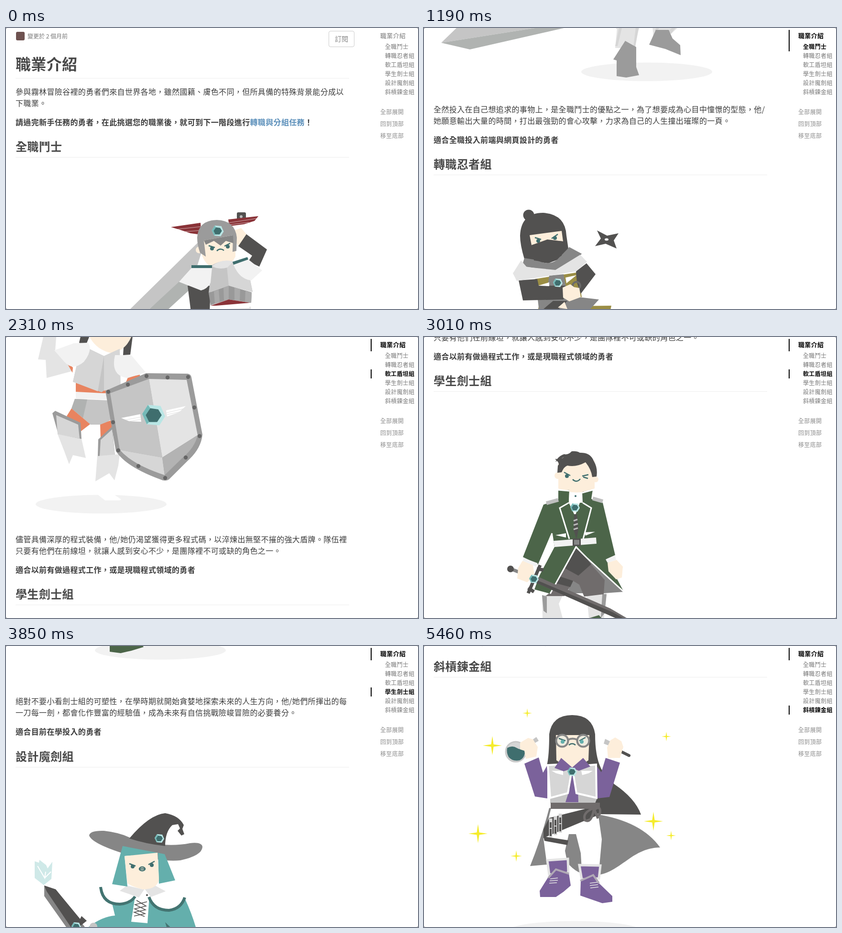
An HTML page for the animation above (5530 ms loop, 862 by 590 pixels).

```html
<!DOCTYPE html>
<html lang="zh-TW">
<head>
<meta charset="utf-8">
<title>職業介紹</title>
<style>
html, body { margin: 0; width: 100%; height: 100%; overflow: hidden; background: #888; }
body { font: 16px/24px "Noto Sans CJK TC", "Noto Sans CJK", sans-serif; letter-spacing: .35px; color: #3c3c3c; }
#stage { position: absolute; width: 862px; height: 590px; overflow: hidden; background: #fff; border-radius: 3px; }
#page, #art { position: absolute; left: 0; top: 0; width: 862px; height: 4800px; }
#page > div, #toc div, .meta { position: absolute; white-space: nowrap; }
h1, h2, p { margin: 0; }
h1, h2 { position: absolute; left: 20px; width: 698px; border-bottom: 1px solid #eee; color: #484848; }
h1 { top: 55px; height: 50px; font-size: 32px; line-height: 38px; }
h2 { height: 37px; font-size: 24px; line-height: 28px; }
p + p { margin-top: 16px; font-weight: 700; }
a { color: #5b8fba; }
.meta { left: 45px; top: 5px; font-size: 12px; letter-spacing: 0; color: #777; }
.avatar { position: absolute; left: 21px; top: 8px; width: 18px; height: 18px; border-radius: 3px; background: #6e5250; }
.button { position: absolute; left: 675px; top: 6px; width: 52px; height: 32px; border: 1px solid #ccc; border-radius: 4px;
  font-size: 14px; line-height: 31px; letter-spacing: 0; text-align: center; color: #888; }
#toc { font-size: 12px; line-height: 18px; color: #777; }
#toc .on { color: #000; font-weight: 700; }
#toc .on::before { content: ""; position: absolute; left: var(--bar); top: 0; width: 2px; height: 100%; background: #000; }
.k { fill: #525150 } .g { fill: #868686 } .m { fill: #9b9b9b } .n { fill: #c5c5c5 } .l { fill: #d6d6d6 } .e { fill: #e4e4e4 }
.f { fill: #f2f2f2 } .w { fill: #fff } .s { fill: #fdeedb } .t { fill: #3f6e6e } .c { fill: #64afac } .d { fill: #706c6c }
.r { fill: #8a3338 } .o { fill: #e88460 } .y { fill: #9b8e45 } .v { fill: #4c6549 } .p { fill: #7b629b }
.line { fill: none; stroke: #3f6e6e; stroke-width: 2.5 }
</style>
</head>
<body>
<div id="stage">
<div id="page">
<svg id="art" viewBox="0 0 862 4800">
<defs>
  <g id="gem"><path fill="#b9e6e5" d="M-5-9L6-8 10 1 5 9-6 8-10-1Z"/><path fill="#74b9b7" d="M-10-1L-5-9-3-6-7 0-4 6-6 8Z"/><path class="t" d="M-3-6L4-5 7 0 3 6-4 6-7 0Z"/></g>
  <path id="star" fill="#f5ec2b" d="M0-20L2.6-2.6 20 0 2.6 2.6 0 20-2.6 2.6-20 0-2.6-2.6Z"/>
  <ellipse id="shadow" class="f" rx="137" ry="19.5"/>
</defs>

<!-- knight -->
<g>
  <path class="n" d="M402 450L260 590 68 748 36 779 232 748 300 590 400 500 430 402Z"/>
  <path fill="#b0b3b1" d="M400 498L300 590 232 748 36 779 96 793 293 748 340 590 400 535Z"/>
  <rect class="k" x="483" y="387" width="19" height="17" rx="3"/><circle cx="492" cy="396" r="3" fill="#bbb"/>
  <path class="s" d="M478 425L492 420 504 434 486 458 478 446Z"/>
  <path class="k" d="M503 433L546 465 530 501 507 490 515 478 486 458Z"/>
  <path class="k" d="M380 541H428L426 600 412 650 390 620Z"/>
  <path class="e" d="M430 585H512L530 748 480 770 470 640 450 750H402Z"/>
  <circle class="s" cx="404" cy="466" r="7"/><path class="s" d="M405 440H480V480Q470 500 440 505Q415 500 408 470Z"/>
  <path class="n" d="M431 498Q450 486 475 490L505 500 516 554 466 541 424 556Z"/>
  <path class="l" d="M462 500L475 490 505 500 516 554 466 541Z"/>
  <path class="e" d="M431 500Q450 484 476 490L463 503Q445 508 431 500Z"/>
  <path fill="#999" d="M424 556L466 541 514 555 513 577 466 570 428 582Z"/>
  <path fill="#aaa" d="M435 553L445 549 447 575 437 579ZM455 545L466 541V570L456 572ZM478 545L490 548 489 573 478 572ZM501 551L514 555 513 577 500 575Z"/>
  <path class="r" d="M428 583L466 570 511 577 490 583Z"/><path class="w" d="M428 584L511 577 509 588 430 591Z"/>
  <path class="f" d="M388 504H431L428 535Q421 548 408 551L362 533ZM476 497L507 486 536 509 513 530Q488 527 476 497Z"/>
  <path class="t" d="M388 498H431V504H388ZM474 491L505 481 507 486 476 497Z"/>
  <path class="r" d="M345 418L407 409 409 434 386 431 365 424ZM465 402L528 395 520 405 498 412 467 416Z"/>
  <path d="M354 423L408 417M368 428L408 425M466 409L524 400M468 413L508 408" stroke="#fff" stroke-width=".6"/>
  <path class="m" d="M418 480L406 472Q400 455 400 440Q402 404 441 403Q479 404 483 440L482 468 474 470 475 435 414 446Z"/>
  <path class="g" d="M414 446L475 435 476 452 460 447 449 457 435 447 418 455Z"/>
  <use href="#gem" transform="translate(443 426) scale(1.25)"/>
  <path class="line" d="M424 457L437 461M457 458L469 452M441 468Q448 461 456 467"/>
  <circle class="t" cx="431" cy="463" r="4"/><circle class="t" cx="464" cy="459" r="4"/>
</g>
<g transform="translate(0 748)">
  <use href="#shadow" x="466" y="92"/>
  <path class="e" d="M404 0H450L440 42H400ZM482 0H530L517 12 482 8Z"/><path class="l" d="M408 0H414L405 38H400ZM443 0H449L442 40H438ZM486 0H492L488 6H482ZM519 0H526L517 12 511 6Z"/>
  <path class="m" d="M421 27L444 40V82L450 99 423 104 403 101V68L396 66ZM485 4H512L520 22 536 36 537 57 505 44 471 35Z"/>
</g>

<!-- ninja -->
<g transform="translate(0 748)">
  <use href="#shadow" x="290" y="867"/>
  <path class="y" d="M240 585L392 583 380 640 330 680 290 640 255 715 215 700Z"/>
  <path class="k" d="M215 695L258 712 250 775 205 785ZM330 675L376 640 395 720 430 735 370 750Z"/>
  <path class="y" d="M232 527L322 513 330 565 240 573Z"/><path class="g" d="M262 520L292 517 302 570 254 570ZM238 570H300L324 565 366 570 348 590 310 605H242Z"/>
  <path class="k" d="M318 511L340 494 359 517 328 558 320 535ZM198 530L237 527 240 541H296L292 570 207 572ZM250 590L270 573H300L280 592Z"/>
  <path class="w" d="M239 541L262 534V542ZM296 524L319 519 298 536Z"/>
  <use href="#gem" x="280" y="535"/>
  <circle cx="319" cy="541" r="8" fill="none" stroke="#6a6a6a" stroke-width="4"/>
  <path class="s" d="M290 545L306 538 314 544 325 546 328 565 304 574 291 566ZM280 587L294 575 300 590Z"/>
  <circle class="k" cx="219" cy="393" r="11.5"/>
  <path class="k" d="M201 436Q203 388 249 388Q296 391 298 436L304 477 289 483 260 494 230 490 210 485Q201 455 201 436Z"/>
  <path class="s" d="M221 435L288 426 291 448 258 445 225 456Z"/>
  <path class="line" d="M232 440L245 444M267 442L280 433"/><circle class="t" cx="239" cy="447" r="4"/><circle class="t" cx="274" cy="441" r="4"/>
  <path class="g" d="M210 483L235 487Q260 500 278 487L304 460 330 474 315 492 273 510 205 500Z"/>
  <path class="k" d="M225 456L258 444 291 448 288 478 262 493 230 488Z"/>
  <path class="e" d="M203 488L215 502 275 508 327 476 341 491 318 511 270 519 194 531 186 515Z"/>
  <path class="k" d="M362 425L383 436 407 431 397 446 403 463 380 453 358 458 370 442Z"/><ellipse class="w" cx="382" cy="444" rx="4" ry="2.5"/>
</g>

<!-- shield bearer -->
<g transform="translate(0 2064)">
  <use href="#shadow" x="199" y="351"/>
  <path class="k" d="M165-40Q167-98 220-98Q270-94 270-40L260 37 245 38 248-10H178L166 20 153 12Z"/>
  <path class="s" d="M177-48L255-55 262 0Q250 28 222 34Q190 28 175 0Z"/>
  <path class="line" d="M192-36L206-30M232-31L247-38M213-12H226"/><circle class="t" cx="200" cy="-28" r="4"/><circle class="t" cx="240" cy="-29" r="4"/>
  <path class="e" d="M78 0H105L103 28 137 64V72L85 86 83 48 67 47Z"/>
  <path class="o" d="M126 52L140 64 139 75ZM255 85L280 79V92L250 97ZM146 94H222V118H146Z"/>
  <path class="n" d="M172 24L205 40 238 25 232 92 200 116 140 94 150 50Z"/><path class="l" d="M172 24L205 40 192 114 140 94 150 50ZM205 40L238 25 240 105 205 113Z"/>
  <path class="f" d="M101 28L142 13 172 12Q182 28 163 52Q140 72 122 52ZM228 38L262 38 292 74 255 86Q218 82 228 38ZM146 115L222 119V132L146 129Z"/>
  <path class="n" d="M144 130L214 133 221 172 205 184H177L137 150Z"/><path fill="#b0b2b1" d="M144 130L170 131 161 170 137 150Z"/>
  <path class="o" d="M137 150L176 183 154 200 127 166ZM197 184L222 174V200L198 213Z"/>
  <path class="m" d="M97 160L103 155 156 180 158 215 110 206ZM193 215L222 188 228 250H192Z"/>
  <path class="l" d="M105 164L151 184 154 213 108 205ZM198 216L222 194 228 250H196Z"/>
  <path class="e" d="M108 204L158 214 167 254 140 248 132 267 122 240ZM191 250L238 246 235 270 227 301 216 286 187 303Z"/>
  <path class="w" d="M192 331L225 330 241 341 238 343H207Z"/>
  <path class="m" d="M208 113L293 76 380 77Q387 78 388 85L411 205Q408 235 380 260L341 299Q333 304 323 299Q252 273 230 240Z"/>
  <path class="n" d="M218 118L299 88 327 253 238 237Z"/><path class="e" d="M299 88L378 90 401 206 327 253Z"/>
  <path class="l" d="M238 237L327 253 332 290Q265 268 238 237Z"/><path fill="#b3b3b3" d="M327 253L401 206Q395 232 370 253L332 290Z"/>
  <g id="rivets" fill="#666"></g>
  <path class="w" d="M241 170L281 162 283 178 258 177ZM376 145L335 154 337 167 362 158Z"/>
  <path d="M250 174L282 168M258 177L282 173M336 159L370 151M337 163L364 157" stroke="#d6d6d6" stroke-width=".8"/>
  <use href="#gem" transform="translate(309 164) scale(2.4)"/>
</g>

<!-- student -->
<g transform="translate(0 3157)">
  <use href="#shadow" x="323" y="9"/><path class="v" d="M217-20H270L288 2 262 10 240 15 217 12Z"/>
</g>
<g transform="translate(0 2512)">
  <path class="e" d="M247 542L290 543 282 560 290 590 270 635H222L248 590ZM340 540L382 538 376 595 345 590Z"/>
  <path class="m" d="M247 542L257 545V580L250 575ZM373 540H382L378 580 370 590Z"/>
  <path class="v" d="M340 592L366 584 380 600 385 628 345 628Z"/>
  <path class="g" d="M340 455L418 535 376 538H300L310 505Z"/>
  <path class="d" d="M298 478H350L378 510 376 540 335 545 325 520 312 512 294 544H254L262 538Z"/>
  <path class="k" d="M318 440L350 477 323 501 292 484ZM282 502L312 512 306 525 276 517Z"/>
  <path class="s" d="M281 260H357V318Q320 335 281 318Z"/><circle class="s" cx="280" cy="291" r="7"/><circle class="s" cx="359" cy="299" r="6"/>
  <path class="k" d="M279 285L280 270Q286 266 274 256Q288 257 293 252L275 262Q281 250 293 246Q302 248 309 240Q320 239 326 243Q348 242 355 260Q364 275 361 293L352 294Q350 278 338 263Q318 274 300 270Q293 272 288 284Z"/>
  <path class="line" d="M293 284L306 291M331 292L344 289M333 294L343 297M311 299Q319 307 327 298"/><circle class="t" cx="299" cy="292" r="4"/>
  <path class="v" d="M250 352L281 342V321H304L303 348H332L331 325 353 321 350 340 374 348 400 458 380 467 376 455 418 535 340 463 318 438 264 539 231 530 242 500 273 441 269 413 240 478 207 462Z"/>
  <path class="w" d="M304 325L331 330 326 348 316 376 303 348Z"/><circle class="t" cx="317" cy="334" r="2"/>
  <path d="M303 348L284 359 304 424M332 348L350 359 333 424M281 321L304 323M331 327L353 321M268 412L240 478M264 539L318 441 340 463 418 535" fill="none" stroke="#fff" stroke-width="3"/>
  <path class="k" d="M314 372H320L323 405 319 424 313 405Z"/><path d="M313 386L321 383M313 395L322 392M313 404L322 401" stroke="#bbb" stroke-width="3"/>
  <use href="#gem" x="316" y="358"/>
  <path d="M256 349L281 342M353 339L374 345" stroke="#bfbfbf" stroke-width="8"/>
  <path class="f" d="M271 428L360 421 361 434 273 441ZM380 467L400 458 402 468 384 474ZM209 464L238 475 234 482 206 472Z"/>
  <path class="w" d="M275 416L297 412V421ZM336 410L358 409 338 417Z"/>
  <rect x="311" y="423" width="17" height="16" class="k"/><rect x="314" y="426" width="11" height="10" class="g"/>
  <path d="M182 487L240 510" stroke="#868686" stroke-width="7"/><circle class="k" cx="181" cy="487" r="7"/>
  <path class="s" d="M206 470L228 479 231 500 216 515 195 507 197 485ZM384 474L403 468 416 482 414 505 402 509 386 492Z"/>
  <path d="M243 479L218 538M236 487L250 489M218 527L230 535" fill="none" stroke="#525150" stroke-width="7"/>
  <path class="d" d="M240 504L390 570 446 603 405 592 234 516Z"/><path class="k" d="M237 511L395 578 440 603 405 592 234 516Z"/>
  <use href="#gem" x="230" y="508"/>
</g>

<!-- witch -->
<g transform="translate(0 3157)">
  <path fill="#437471" d="M230 575H390L402 662H217Z"/>
  <path class="c" d="M222 541Q250 548 268 527L300 530Q310 556 342 556Q362 553 375 532Q388 560 397 590V625L370 662H230L222 600 190 610 170 592Q200 568 228 566Z"/>
  <path fill="#437471" d="M333 580L342 610 335 662H370L380 625Z"/>
  <path class="w" d="M270 526L300 524 296 582 262 579Z"/>
  <path d="M273 534L293 546 269 552 291 562 268 567M295 537L270 543 292 554 268 559 290 568" fill="none" stroke="#525150" stroke-width="1.5"/>
  <path d="M198 506Q202 542 238 542Q261 540 270 526M299 527Q309 555 341 555Q366 552 374 528" fill="none" stroke="#437471" stroke-width="6"/>
  <path class="e" d="M253 503L287 511 312 503 334 515 303 527 290 510 278 528 238 514Z"/><circle class="k" cx="295" cy="523" r="2"/>
  <path class="g" d="M174 398Q175 387 205 388Q240 392 262 404Q330 425 385 414Q410 411 411 422Q410 440 365 450Q330 454 250 437Q180 415 174 398Z"/>
  <path class="k" d="M258 404Q300 354 333 351Q362 356 372 376L369 384 373 395 367 398 359 388 364 383 360 374 348 376Q333 390 333 420Q290 415 258 404Z"/>
  <use href="#gem" x="321" y="404"/>
  <path class="c" d="M244 420L332 437 354 492 320 499 318 435 248 441 254 505 222 500Z"/>
  <path class="s" d="M248 441L317 434 320 490Q317 510 287 511Q262 505 254 498Z"/>
  <path class="line" d="M258 457L271 462M298 459L311 452"/><circle class="t" cx="265" cy="463" r="4"/><circle class="t" cx="305" cy="460" r="4"/>
  <ellipse cx="285" cy="468" rx="6" ry="4" class="line"/><path d="M280 468H290" class="line"/>
  <path class="g" d="M80 503L104 511 165 590 140 610 80 525Z"/><path class="k" d="M80 503L104 511 155 573 158 567 169 577 150 592 137 592 85 515Z"/>
  <use href="#gem" x="147" y="589"/><circle class="n" cx="183" cy="589" r="8"/>
  <path fill="#cfe9e8" d="M60 452L69 455 70 449 84 460 87 467 97 453 95 489 79 502 60 487Z"/><path d="M66 462L81 487 83 474M81 487L94 474" fill="none" stroke="#fff" stroke-width="2"/>
</g>
<g transform="translate(0 3819)">
  <use href="#shadow" x="300" y="141"/><ellipse class="f" cx="502" cy="146" rx="53" ry="8"/>
  <path fill="#437471" d="M217 0H396L424 94 202 67Z"/><path fill="#b0b2b1" d="M250 18H346V66L325 35 302 65 258 36Z"/>
  <path class="k" d="M225-5H370L381 13 220 24ZM254 29L296 58 304 110 292 119 275 118 238 134 243 110 262 95ZM325 36L345 60 343 138 293 149 273 145 275 135 300 125 308 105 303 60Z"/>
  <path d="M259 70L252 29 297 61 300 95M306 92L303 66 325 33 346 66" fill="none" stroke="#e4e4e4" stroke-width="5"/>
  <path class="w" d="M280 117L293 103 303 109 300 120ZM311 125L323 107 335 99 325 122Z"/>
  <path class="s" d="M386-10H403L408 20 400 32 387 25Z"/>
  <path class="k" d="M467 146Q462 112 470 113L469 94 478 108 488 93 491 113 494 127Q525 125 531 144L528 147Z"/>
  <path d="M523 140Q534 130 528 110Q526 88 542 86" fill="none" stroke="#525150" stroke-width="6" stroke-linecap="round"/>
  <circle cx="473" cy="123" r="1.5" fill="#d99a5b"/><circle cx="481" cy="123" r="1.5" fill="#d99a5b"/>
</g>

<!-- alchemist -->
<g transform="translate(0 4155)">
  <use href="#shadow" x="315" y="597"/>
  <path class="g" d="M262 340Q245 405 222 462L300 455Q320 480 350 482C410 482 430 424 494 423Q455 368 360 353Z"/>
  <path class="k" d="M257 251Q262 230 262 185Q268 145 310 145Q352 145 358 185Q358 235 372 260L398 290Q442 320 454 354L362 353 260 262Z"/>
  <path class="w" d="M266 340L364 350 372 406 367 462 330 470 328 435 318 395H303L295 430 299 450H256L250 405Z"/>
  <path class="k" d="M262 361L345 340 368 342 362 356 250 403V385ZM250 400L302 408 300 418 252 409Z"/>
  <path class="n" d="M264 315L300 308H320L362 320 358 330H264Z"/>
  <path class="p" d="M305 300L310 268 322 300 323 328H296ZM210 247L240 234 249 266 258 250V320L232 316ZM380 235L410 245 388 317 362 320V253L371 265Z"/>
  <path d="M259 250L297 248 308 268 301 309 264 319ZM312 266L322 252 360 249 361 319 319 309Z" fill="#d6d6d6" stroke="#fff" stroke-width="4"/>
  <path class="w" d="M267 262H291V271L276 267ZM329 262H353L345 267 331 271Z"/>
  <path class="s" d="M276 187H346L344 240 311 262 277 240Z"/>
  <path class="p" d="M273 256L287 235 310 255 333 235 348 253 324 262 311 257 292 263Z"/><use href="#gem" x="310" y="264"/>
  <g fill="#eeebdf" stroke="#868686" stroke-width="4"><circle cx="289" cy="199" r="12.5"/><circle cx="333" cy="199" r="12.5"/><path d="M301 197Q311 192 321 197" fill="none"/></g>
  <path class="line" d="M282 194L296 199M325 199L338 192M303 208Q310 202 317 208"/><circle class="c" cx="290" cy="201" r="4"/><circle class="c" cx="330" cy="201" r="4"/>
  <circle cx="192" cy="222" r="21" fill="#d6d6d6" stroke="#c8c8c8" stroke-width="3"/><path class="t" d="M174 214Q185 208 194 214Q203 220 211 215Q213 234 200 240Q185 243 177 233Q172 224 174 214Z"/>
  <path class="n" d="M224 199L235 191 240 199 228 206ZM379 195L393 202 389 210 376 205Z"/>
  <path d="M413 222L429 230" stroke="#525150" stroke-width="6" stroke-linecap="round"/>
  <path class="s" d="M201 203L218 193 228 196 238 212 235 232 213 237 210 220 201 217ZM390 198L400 192 413 200 417 212 410 235 385 235 383 213Z"/>
  <path class="d" d="M265 329H368V342H265Z"/><path d="M356 340Q330 350 337 366Q350 372 355 345Q371 332 368 352Q362 362 357 345L364 362" fill="none" stroke="#706c6c" stroke-width="5"/>
  <path d="M265 362V402M275 357V397M285 352V392" stroke="#d6d6d6" stroke-width="7"/><path d="M265 370V382M275 365V377M285 360V372M265 384V399M275 379V394M285 374V389" stroke="#525150" stroke-width="4"/>
  <path d="M258 450L301 447 302 476 262 480ZM325 460L369 461 366 488 330 490Z" fill="#7b629b" stroke="#e4e4e4" stroke-width="5"/>
  <path class="p" d="M262 482L276 466 303 477 307 503 292 516 276 527H243L242 514ZM328 492L354 480 366 498 394 525V537L373 540 327 524Z"/>
  <path d="M260 487L276 469 303 478M327 493L354 481 366 498" fill="none" stroke="#b0a9b5" stroke-width="4"/>
  <path d="M264 489L280 487M263 493L280 492M262 498L278 497M347 498L363 496M347 503L364 501M348 508L365 506" stroke="#e4e4e4" stroke-width="1.5"/>
  <g id="stars"></g>
</g>
</svg>
<div class="avatar"></div><div class="meta">變更於 2 個月前</div><div class="button">訂閱</div>
<h1>職業介紹</h1>
</div>
<div id="toc"></div>
</div>
<script>
const page = document.getElementById('page'), toc = document.getElementById('toc');

// Section headings: name and y of the rule below.
const sections = [['全職鬥士', 271], ['轉職忍者組', 1056], ['軟工盾坦組', 1841], ['學生劍士組', 2626], ['設計魔劍組', 3411], ['斜槓鍊金組', 4220]];
// Paragraph blocks: y of the first line's centre, text, closing bold line.
const blocks = [
  [134, '參與霧林冒險谷裡的勇者們來自世界各地，雖然國籍、膚色不同，但所具備的特殊背景能分成以<br>下職業。',
    '請過完新手任務的勇者，在此挑選您的職業後，就可到下一階段進行<a>轉職與分組任務</a>！'],
  [919, '全然投入在自己想追求的事物上，是全職鬥士的優點之一，為了想要成為心目中憧憬的型態，他/<br>她願意輸出大量的時間，打出最強勁的會心攻擊，力求為自己的人生撞出璀璨的一頁。',
    '適合全職投入前端與網頁設計的勇者'],
  [1704, '白天在原本的崗位上努力，夜晚則默默修練程式忍術，他/她們擅長把握零碎的時間，一步一步<br>累積實力，等待時機成熟，便能順利轉職成功。', '適合目前在職、想要轉職的勇者'],
  [2489, '儘管具備深厚的程式裝備，他/她仍渴望獲得更多程式碼，以淬煉出無堅不摧的強大盾牌。隊伍裡<br>只要有他們在前線坦，就讓人感到安心不少，是團隊裡不可或缺的角色之一。',
    '適合以前有做過程式工作，或是現職程式領域的勇者'],
  [3273, '絕對不要小看劍士組的可塑性，在學時期就開始貪婪地探索未來的人生方向，他/她們所揮出的每<br>一刀每一劍，都會化作豐富的經驗值，成為未來有自信挑戰險峻冒險的必要養分。',
    '適合目前在學投入的勇者'],
  [4059, '左手施法繪圖，右手還企圖學程式邏輯，會不會太逆天了？擁有設計背景的他/她們，所施展的法<br>術都會讓人為之驚艷。現在還想學程式？是想要逼死誰呀~企圖想擁有設計與邏輯腦的神隊友，絕<br>對是您的最佳拍檔。',
    '適合有在投入視覺設計領域的勇者']
];
const add = (parent, html) => { parent.insertAdjacentHTML('beforeend', html); return parent.lastElementChild; };
for (const [name, rule] of sections) add(page, `<h2 style="top:${rule - 37}px">${name}</h2>`);
for (const [y, text, bold] of blocks) add(page, `<div style="left:20px;top:${y - 13}px"><p>${text}</p><p>${bold}</p></div>`);

const tocItem = (text, x, y, height, style = '') =>
  add(toc, `<div style="left:${x}px;top:${y}px;height:${height}px;--bar:${763 - x}px;${style}">${text}</div>`);
const tocTitle = tocItem('職業介紹', 783, 4, 26, 'font-size:13px;line-height:24px');
const tocLinks = sections.map(([name], i) => tocItem(name, 793, 30 + 19 * i, 19));
['全部展開', '回到頂部', '移至底部'].forEach((text, i) => tocItem(text, 783, 167 + 25 * i, 19, 'color:#8c8c8c;font-weight:500'));

const rivets = [[294, 82], [338, 85], [381, 84], [394, 148], [405, 208], [376, 253], [333, 296], [277, 271], [235, 238], [224, 179], [214, 115], [255, 100]];
document.getElementById('rivets').innerHTML = rivets.map(([x, y]) => `<circle cx="${x}" cy="${y}" r="4.2"/>`).join('');
const stars = [[143, 209, 1], [216, 141, .5], [507, 190, .5], [113, 394, 1], [193, 441, .6], [480, 368, 1], [517, 398, .5]];
document.getElementById('stars').innerHTML = stars.map(([x, y, k]) => `<use href="#star" transform="translate(${x} ${y}) scale(${k})"/>`).join('');

// Scroll flicks: start ms, end ms, from, to, ease-out power.
const flicks = [
  [0, 1260, 0, 750, 2], [1330, 1610, 750, 900, 2], [1680, 2100, 900, 1885, 1.5], [2170, 3080, 1885, 2516, 2],
  [3150, 3850, 2516, 3157, 1], [3850, 4410, 3157, 3819, 1], [4410, 5390, 3819, 4155, 2]
];
function scrollAt(time) {
  const [start, end, from, to, power] = flicks.findLast(flick => time >= flick[0]);
  const progress = Math.min(1, (time - start) / (end - start));
  return Math.round(from + (to - from) * (1 - (1 - progress) ** power));
}

const STEP = 70, LOOP = 5530, SPY_LINE = 112;
function draw(now) {
  const scroll = scrollAt(Math.floor(now % LOOP / STEP) * STEP);
  page.style.transform = `translateY(${-scroll}px)`;
  const current = sections.findLastIndex(([, rule]) => rule - scroll <= SPY_LINE);
  tocTitle.className = scroll > 0 ? 'on' : '';
  tocTitle.style.fontWeight = scroll > 0 ? 700 : 500;
  tocLinks.forEach((link, i) => { link.className = i === current ? 'on' : ''; });
}
const origin = performance.now();
function tick() {
  draw(performance.now() - origin);
  requestAnimationFrame(tick);
}
tick();
</script>
</body>
</html>
```
